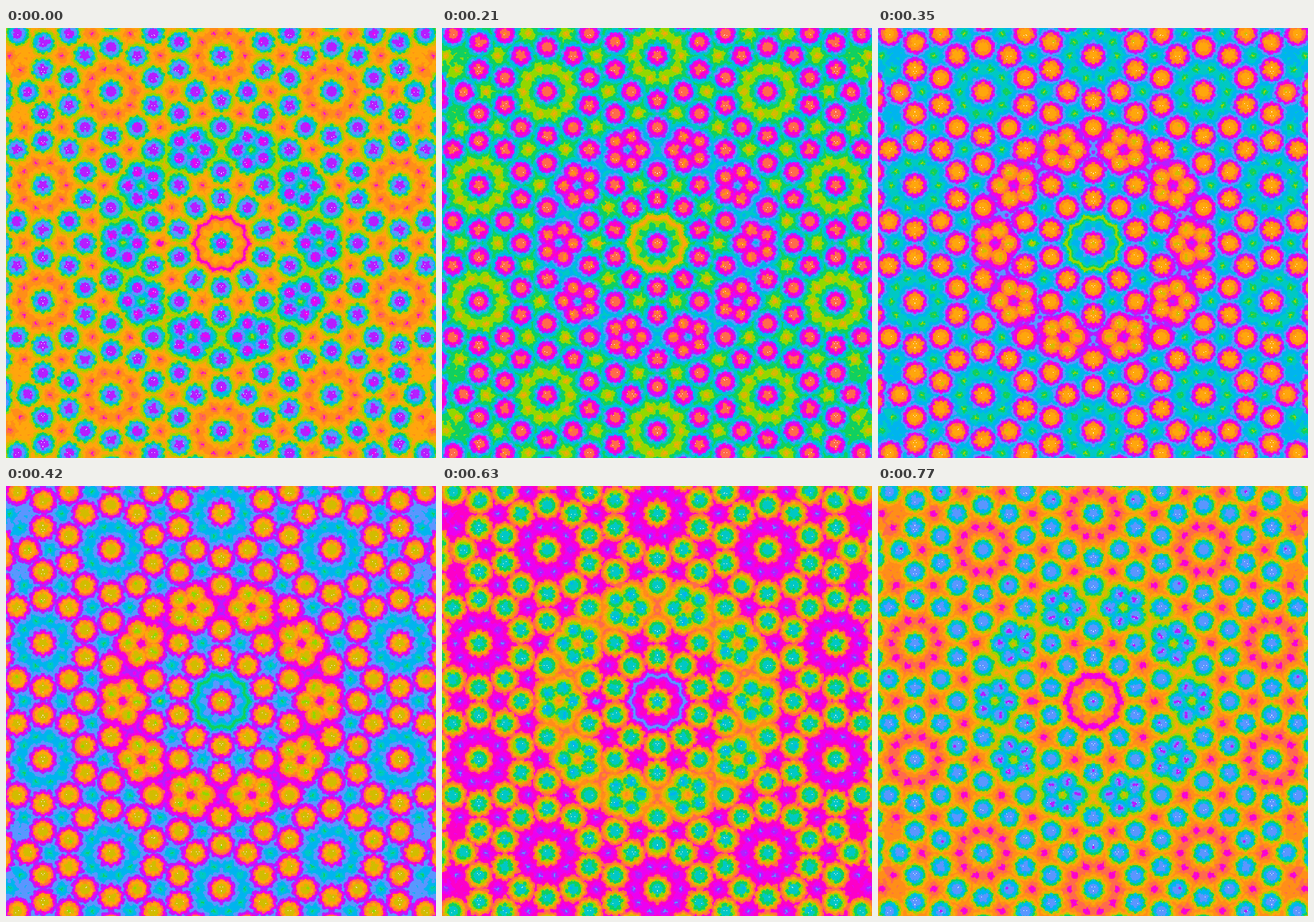
These frames come from a looping animation (600 by 600 pixels, 0.84 s). An HTML page with a canvas:

```html
<!DOCTYPE html>
<html lang="en">
<head>
<meta charset="utf-8">
<title>Quasicrystal colour cycle</title>
<style>
  html, body { margin: 0; width: 100%; height: 100%; overflow: hidden; background: #fff; }
  canvas { display: block; width: 600px; height: 600px; }
</style>
</head>
<body>
<canvas id="stage" width="600" height="600"></canvas>
<script>
const start = performance.now();
const SIZE = 600, HALF = 300, STEP = 70;
const PHI = (1 + Math.sqrt(5)) / 2;
const PALETTE = [
  0xb41eff, 0xec00f0, 0xfc00c8, 0xff6a4c, 0xff8e18, 0xffa60c,
  0xd2bc00, 0x92d800, 0x10d060, 0x00c8c4, 0x00b4ee, 0x5a96ff
];
const COUNT = PALETTE.length;

// Ten points on a circle; turn is the starting angle in degrees.
const ring = (r, turn, [cx, cy] = [0, 0]) =>
  Array.from({ length: 10 }, (_, k) => {
    const a = (turn + 36 * k) * Math.PI / 180;
    return [cx + r * Math.cos(a), cy + r * Math.sin(a)];
  });

const mirror = (points) =>
  points.flatMap(([x, y]) => [[x, y], [-x, y], [x, -y], [-x, -y]]);

const unique = (points) => {
  const kept = [];
  for (const p of points) {
    if (Math.max(Math.abs(p[0]), Math.abs(p[1])) < 340 &&
        !kept.some((q) => Math.hypot(p[0] - q[0], p[1] - q[1]) < 5)) kept.push(p);
  }
  return kept;
};

// Rosettes carry two rings of flowers; five-flower clusters circle the middle.
const outer = ring(100 * PHI * PHI, 18);
const rosettes = [[0, 0], ...outer];
const clusters = ring(137, 0);
const blooms = unique([
  ...rosettes.flatMap((c) => [c, ...ring(100 / PHI, 18, c), ...ring(100, 18, c)]),
  ...mirror([[270, 211], [248, 280], [284, 292], [306, 223], [306, 199]])
]).map(([x, y]) => ({ x, y, width: 14, power: 3 }));
clusters.forEach(([cx, cy], k) => {
  for (let j = 0; j < 5; j++) {
    const a = Math.PI + (k * 36 + j * 72) * Math.PI / 180;
    blooms.push({ x: cx + 20 * Math.cos(a), y: cy + 20 * Math.sin(a), width: 12.5, power: 2.4 });
  }
});
const stars = unique([
  ...outer.flatMap((c) => ring(33, 0, c)),
  ...rosettes.flatMap((c) => ring(85, 0, c)),
  ...mirror([[280, 242], [295, 230], [295, 261]])
]);

const bump = (d, width, power = 2) => Math.exp(-Math.pow(Math.abs(d) / width, power));

// Colour level at a place, and its distance to the nearest flower.
function level(x, y) {
  let sum = 0, near = 99;
  for (const f of blooms) {
    const dx = x - f.x, dy = y - f.y;
    if (Math.abs(dx) > 40 || Math.abs(dy) > 40) continue;
    const d = Math.hypot(dx, dy);
    near = Math.min(near, d);
    const petal = 1 + 0.06 * Math.cos(10 * Math.atan2(dy, dx));
    sum += Math.pow(bump(d * petal, f.width, f.power), 2.5);
  }
  const glow = Math.pow(sum, 0.4);
  const r = Math.hypot(x, y), a = Math.atan2(y, x);

  let v = 4.6 + 7.6 * glow + 1.3 * (1 - Math.min(1, glow)) * bump(r - 138, 32, 4);
  for (const [cx, cy] of clusters) v += 0.6 * bump(Math.hypot(x - cx, y - cy), 31, 4);
  for (const [sx, sy] of stars) {
    const dx = x - sx, dy = y - sy;
    if (Math.abs(dx) < 20 && Math.abs(dy) < 20) v -= 2.6 * bump(Math.hypot(dx, dy), 6.5);
  }
  v -= 2.9 * bump(r - 36 - 2 * Math.cos(10 * a), 5.5);
  v -= 1.5 * bump(Math.hypot((x + 86) / 10, y / 6), 1, 4);

  let wave = 0;
  for (let k = 0; k < 5; k++) {
    const t = k * Math.PI / 5;
    wave += Math.cos((x * Math.cos(t) + y * Math.sin(t)) * 0.68);
  }
  return [v + 0.12 * wave, near];
}

// Vertices of a Penrose tiling, by repeated division of a ten-part wheel.
const vertices = new Map();
const mix = (p, q) => [p[0] + (q[0] - p[0]) / PHI, p[1] + (q[1] - p[1]) / PHI];
const EDGE = HALF + 4;
const outside = (a, b, c) => [0, 1].some((i) =>
  Math.min(a[i], b[i], c[i]) > EDGE || Math.max(a[i], b[i], c[i]) < -EDGE);

function divide(wide, a, b, c, depth) {
  if (outside(a, b, c)) return;
  if (!depth) {
    for (const p of [a, b, c])
      vertices.set(Math.round(p[0] * 2) * 4096 + Math.round(p[1] * 2), p);
    return;
  }
  const n = depth - 1;
  if (!wide) {
    const p = mix(a, b);
    divide(false, c, p, b, n);
    divide(true, p, c, a, n);
  } else {
    const q = mix(b, a), r = mix(b, c);
    divide(true, r, c, a, n);
    divide(true, q, r, b, n);
    divide(false, r, q, a, n);
  }
}
const rim = ring(100 * Math.pow(PHI, 4), -18);
for (let k = 0; k < 10; k++) {
  const pair = [rim[k], rim[(k + 1) % 10]];
  if (k % 2) pair.reverse();
  divide(false, [0, 0], ...pair, 11);
}

// Stamp hard-edged dots into one map of colour levels, bright flowers last.
const map = new Uint8Array(SIZE * SIZE).fill(255);
const dots = [...vertices.values()].map(([x, y]) => {
  const [v, near] = level(x, y);
  return { x: x + HALF, y: y + HALF, v, size: near < 7 ? 2 : 2.8 };
}).sort((p, q) => p.v - q.v);

for (const { x, y, v, size } of dots) {
  const tone = (Math.round(v) + COUNT) % COUNT;
  for (let py = Math.max(0, Math.ceil(y - size)); py <= Math.min(SIZE - 1, y + size); py++) {
    for (let px = Math.max(0, Math.ceil(x - size)); px <= Math.min(SIZE - 1, x + size); px++) {
      if ((px - x) ** 2 + (py - y) ** 2 <= size * size) map[py * SIZE + px] = tone;
    }
  }
}

const ctx = document.getElementById('stage').getContext('2d');
const image = ctx.createImageData(SIZE, SIZE);
const pixels = new Uint32Array(image.data.buffer);
const abgr = PALETTE.map((c) =>
  (0xff000000 | (c & 255) << 16 | (c & 0xff00) | c >> 16) >>> 0);

let shown = -1;
function draw() {
  const step = Math.floor(Math.max(0, performance.now() - start) / STEP) % COUNT;
  if (step !== shown) {
    shown = step;
    for (let i = 0; i < map.length; i++)
      pixels[i] = map[i] === 255 ? 0xffffffff : abgr[(map[i] + step) % COUNT];
    ctx.putImageData(image, 0, 0);
  }
  requestAnimationFrame(draw);
}
draw();
</script>
</body>
</html>
```
